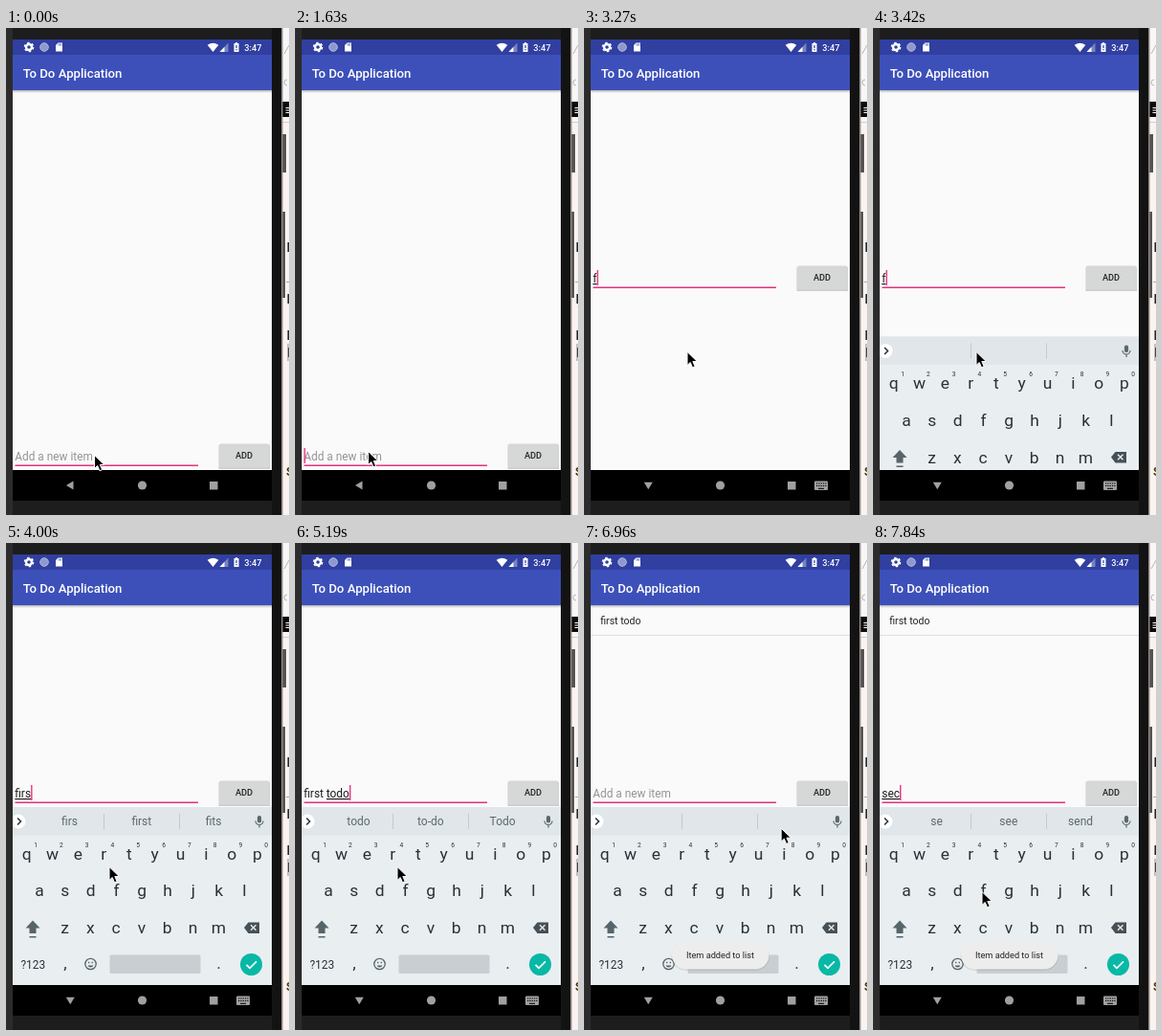
These frames come from a looping animation (296 px wide and 509 px high, 7.99 s). An HTML page:

```html
<!DOCTYPE html>
<html lang="en">
<head>
<meta charset="utf-8">
<title>To Do Application</title>
<style>
html, body { margin: 0; width: 100%; height: 100%; overflow: hidden; background: #1d1d1e; }
svg { display: block; width: 296px; height: 509px; font-family: Roboto, sans-serif; }
text { white-space: pre; }
.mid { text-anchor: middle; }
.bold { font-weight: 500; }
u, .composing { text-decoration: underline; }
</style>
</head>
<body>
<svg viewBox="0 0 296 509">
  <defs>
    <linearGradient id="side"><stop stop-color="#2c2c2d"/><stop offset=".6" stop-color="#222"/><stop offset="1" stop-color="#121212"/></linearGradient>
    <linearGradient id="drop" x2="0" y2="1"><stop stop-opacity=".28"/><stop offset="1" stop-opacity="0"/></linearGradient>
    <clipPath id="screen"><path d="M7 12h271v450H7z"/></clipPath>
  </defs>

  <!-- page behind the device -->
  <g>
    <path fill="#faf3ef" d="M288 0h8v509h-8z"/>
    <path fill="#f8f7f7" d="M288 0h8v98h-8z"/>
    <path fill="#0b0b0b" d="M288 77h8v16h-8z"/>
    <path stroke="#fff" d="M292.500 83.500h4m-4 2.500h4m-4 2.500h4"/>
    <path stroke="#d8cccc" d="M288 98.500h8"/>
    <path stroke="#b5b5b5" fill="none" d="M296 18l-5 9M294 54a3 3 0 1 0 0 6"/>
    <path fill="#545252" d="M289 111h4v40h-4zM289 192h3v90h-3z"/>
    <path fill="#222" d="M294.500 224h1.500v10h-1.500zM294.500 278h1.500v10h-1.500zM294.500 316h1.500v10h-1.500z"/>
    <path stroke="#aaa" d="M293 265.500h3"/>
    <path fill="#c4c1c0" d="M294 330h2v18h-2z"/><path fill="#444" d="M295 334h1v10h-1z"/>
    <text x="293" y="468" font-size="12" font-weight="700" fill="#4a3a10">S</text>
    <path fill="#8c8580" d="M288 0h1.500v509H288z"/>
  </g>

  <!-- device -->
  <path fill="#1d1d1e" d="M0 0h288v509H0z"/>
  <path fill="url(#side)" d="M0 0h7v509H0zM278 0h10v509h-10z"/>
  <path fill="#fafafa" d="M7 12h271v450H7z"/>
  <path fill="url(#drop)" d="M7 65h271v3H7z"/>
  <path fill="#3d50ba" d="M7 28h271v37H7z"/>
  <path fill="#303fa0" d="M7 12h271v16H7z"/>
  <text class="bold" x="17.800" y="51.500" font-size="13.200" fill="#fff">To Do Application</text>

  <!-- status bar -->
  <g fill="#fff">
    <circle cx="24" cy="20" r="3" fill="none" stroke="#fff" stroke-width="2.400"/>
    <circle cx="24" cy="20" r="4.600" fill="none" stroke="#fff" stroke-width="1.400" stroke-dasharray="2.400 2.420"/>
    <circle cx="40" cy="20" r="4.300" fill="#8f98cf" stroke="#b1b8df"/>
    <path d="M54.500 15.500h4.500v9h-7v-6.500z"/>
    <path stroke="#303fa0" stroke-width=".7" d="M55 16.500v2m1.500-2v2m1.500-2v2"/>
    <path d="M216.500 25l-5.800-7.200q5.800-4 11.600 0z"/>
    <path opacity=".35" d="M232.500 15.500v9.500h-9z"/><path d="M228.500 19.700v5.300h-5z"/>
    <path d="M240 15h2v1h1.500v9h-5v-9h1.500z"/>
    <path fill="#303fa0" d="M240.400 18h1.200v3h-1.200zM240.400 22h1.200v1.200h-1.200z"/>
    <text class="bold" x="249.300" y="23.500" font-size="9.200">3:47</text>
  </g>

  <g id="item">
    <text x="17.300" y="84.500" font-size="10.500" fill="#222">first todo</text>
    <path stroke="#dedede" d="M7 96.500h271"/>
  </g>

  <!-- entry row -->
  <g id="entry">
    <path fill="#000" opacity=".18" d="M222.500 436h53.500v25h-53.500z"/>
    <rect id="button" x="223" y="434.500" width="52.500" height="25" rx="1.500"/>
    <text class="mid bold" x="249" y="450.300" font-size="9.200" fill="#222">ADD</text>
    <path fill="#e2337f" d="M9.500 456.500h191.500v1.500H9.500z"/>
    <text id="field" x="9.300" y="452" font-size="11.870"><tspan id="done"></tspan><tspan id="word" class="composing"></tspan></text>
    <path id="caret" fill="#f0307e" d="M0 439h1.400v16H0z"/>
  </g>

  <g clip-path="url(#screen)">
    <g id="keyboard">
      <path fill="#e9eef1" d="M7 276h271v186H7z"/>
      <path fill="#e0e6e9" d="M7 276h271v29.500H7z"/>
      <circle cx="13" cy="291" r="7.500" fill="#fff"/>
      <path fill="none" stroke="#263238" stroke-width="1.500" d="M12 287.500l3.500 3.500-3.500 3.500"/>
      <path stroke="#c3cbcf" d="M102.500 283v16M181.500 283v16"/>
      <g id="hints" class="mid" font-size="12" fill="#5c686e"></g>
      <g fill="none" stroke="#5c686e" stroke-width="1.200">
        <rect x="263.500" y="285.500" width="3" height="6.500" rx="1.500" fill="#5c686e"/>
        <path d="M261 290.500a4 4 0 0 0 8 0M265 294.500v3"/>
      </g>
      <g id="keys" class="mid" font-size="17.400" fill="#263238"></g>
      <path fill="#57646a" d="M28 394.500l7.500 8h-4v5.500h-7v-5.500h-4zM24.500 411h7v1.600h-7z"/>
      <path fill="#455157" d="M249 402l4.500-5.500H265v11.500H253.500z"/>
      <path stroke="#e9eef1" stroke-width="1.400" d="M256 399.200l5.500 5.500m0-5.500l-5.500 5.500"/>
      <g fill="none" stroke="#57646a" stroke-width="1.300">
        <circle cx="88.500" cy="440" r="5.700"/><path d="M85.500 441.500a3.200 3.200 0 0 0 6 0z" fill="#57646a" stroke="none"/>
        <path d="M86 438.500h1.400m2.200 0h1.400" stroke-width="1.600"/>
      </g>
      <rect x="108.500" y="430.500" width="95" height="19.500" rx="1.500" fill="#c8ced1"/>
      <circle cx="256.500" cy="440.500" r="11.500" fill="#08b8a5"/>
      <path fill="none" stroke="#fff" stroke-width="1.700" d="M251.500 440.800l3.500 3.500 7-7"/>
    </g>
  </g>

  <g id="toast">
    <rect x="91.500" y="417" width="102.500" height="30" rx="15" opacity=".09"/>
    <rect x="92" y="416" width="101.500" height="29.500" rx="14.700" fill="#ededed"/>
    <text class="mid" x="142.500" y="434" font-size="9.200" fill="#222">Item added to list</text>
  </g>

  <!-- navigation bar -->
  <path d="M7 462h271v32H7z"/>
  <g fill="#a0a0a0">
    <path id="back" d="M63 478l7.500-4.500v9z"/>
    <circle cx="142.500" cy="478" r="4.600"/>
    <path d="M213 474h8.500v8.500H213z"/>
    <g id="switcher">
      <rect x="241" y="473.500" width="14" height="9.500" rx="1"/>
      <path stroke="#000" stroke-width="1.200" stroke-dasharray="1.300 1" d="M243 476h10.500M243 478.500h10.500"/>
      <path stroke="#000" d="M245 481.300h6"/>
    </g>
  </g>

  <path id="mouse" stroke="#fff" stroke-width="1" stroke-linejoin="round"
    d="M.5.500v14l3.200-3 2.300 5.300 2.600-1.100-2.300-5.200h4.500z"/>
</svg>
<script>
const LOOP = 7990, TICKS = 54;
const $ = id => document.getElementById(id);
const show = (id, on) => $(id).style.display = on ? '' : 'none';
const clamp = v => Math.max(0, Math.min(1, v));

const label = (x, y, s, size = '') =>
  `<text x="${x}" y="${y}"${size && ` font-size="${size}"`}>${s}</text>`;
const row = (letters, x, y) => [...letters].map((c, i) => label(x + 26.8 * i, y, c)).join('');
$('keys').innerHTML = row('qwertyuiop', 21.7, 330.5) + row('asdfghjkl', 35, 369.3) + row('zxcvbnm', 61.5, 408)
  + [...'1234567890'].map((c, i) => label(31 + 26.8 * i, 317.5, c, 6.6)).join('')
  + label(28.3, 444.7, '?123', 11.9) + label(62, 445, ',') + label(222.5, 445, '.');

// [tick, committed text, word being composed, suggestions]
const typing = [
  [0, '', '', ''],
  [22, '', 'f', ''],
  [24, '', 'fi', 'fi first find'],
  [26, '', 'fir', 'fir first fire'],
  [27, '', 'firs', 'firs first fits'],
  [28, '', 'first', 'first First firsts'],
  [29, 'first ', '', 'time one thing'],
  [30, 'first ', 't', 't the time'],
  [31, 'first ', 'to', 'to too together'],
  [32, 'first ', 'tod', 'tod today Todd'],
  [33, 'first ', 'todo', 'todo to-do Todo'],
  [42, '', '', 'todo to-do Todo'],
  [43, '', '', ''],
  [51, '', 's', 's so see'],
  [52, '', 'se', 'se see send'],
  [53, '', 'sec', 'se see send']
];
// [tick, x, y]
const path = [
  [0, 92, 446], [6, 92, 446], [11, 76, 442], [12, 92, 380], [13, 108, 298], [14, 132, 27],
  [15, 132, 27], [17, 120, 220], [19, 107.5, 338], [34, 107.5, 338], [35, 106.5, 338],
  [37, 150, 325], [39, 274, 275], [41, 248.5, 258], [46, 248.5, 258], [49, 120, 377], [50, 113.5, 364], [54, 113.5, 364]
];
const caretOff = [[0, 3], [6, 10], [13, 16], [19, 22], [37, 40], [45, 48]];

function pointer(k) {
  const i = path.findIndex(p => p[0] > k);
  const [a, x, y] = path[i - 1], [b, x2, y2] = path[i];
  const f = (k - a) / (b - a);
  return [x + (x2 - x) * f, y + (y2 - y) * f];
}

let last = -1;
function draw(now) {
  requestAnimationFrame(draw);
  const k = Math.min(TICKS - 1, Math.floor((now % LOOP + 4) * TICKS / LOOP));
  if (k === last) return;
  last = k;

  const [, done, word, hints] = typing.filter(s => s[0] <= k).pop();
  const empty = !(done + word), raised = k >= 22;
  $('done').textContent = empty ? 'Add a new item' : done;
  $('word').textContent = word;
  $('field').setAttribute('fill', empty ? '#949494' : '#1c1c1c');
  $('hints').innerHTML = hints && hints.split(' ').map((s, i) => label(66.5 + 75.3 * i, 295.3, s)).join('');

  const width = empty ? 0 : $('field').getComputedTextLength();
  $('caret').setAttribute('transform', `translate(${9.4 + width})`);
  show('caret', !caretOff.some(([a, b]) => k >= a && k < b));

  $('entry').setAttribute('transform', `translate(0 ${raised ? -186 : 0})`);
  $('button').setAttribute('fill', k === 41 || k === 42 ? '#bebebe' : k === 43 ? '#cacbcb' : '#d6d7d7');
  $('keyboard').setAttribute('transform', `translate(0 ${186 * (1 - clamp((k - 22) / 2)) ** 2})`);
  $('back').setAttribute('transform', raised ? 'rotate(-90 67.250 478)' : '');
  show('switcher', raised);
  show('item', k >= 42);
  $('toast').setAttribute('opacity', clamp((k - 42) / 2));
  $('mouse').setAttribute('transform', `translate(${pointer(k)})`);
}
requestAnimationFrame(draw);
</script>
</body>
</html>
```
